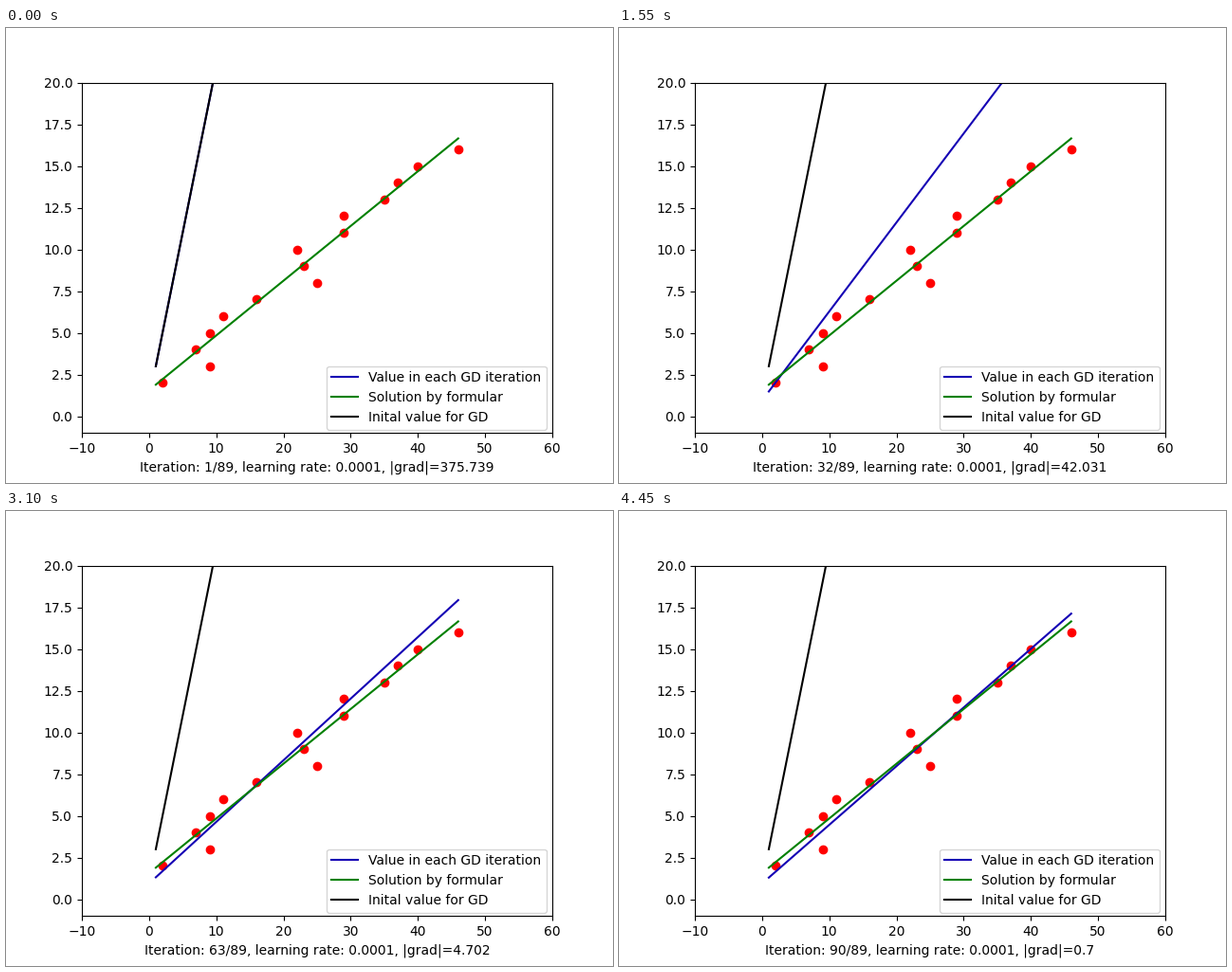
Recreate the animation shown at these times as a matplotlib script. Size 640x480 px, loop 4.5 s.

```python
import matplotlib.pyplot as plt
import numpy as np
from matplotlib.animation import FuncAnimation

STEPS = 90
RATE = 0.0001

plt.rcParams["font.family"] = "DejaVu Sans"

x = np.array([2, 9, 7, 9, 11, 16, 25, 23, 22, 29, 29, 35, 37, 40, 46], float)
y = np.arange(2, 17, dtype=float)
design = np.column_stack([np.ones_like(x), x])
ends = np.array([1.0, 46.0])


def gradient(weights):
    return design.T @ (design @ weights - y) / len(x)


def line_at(weights):
    return weights[0] + weights[1] * ends


def descend(start):
    path = [start]
    for _ in range(STEPS - 1):
        path.append(path[-1] - RATE * gradient(path[-1]))
    return path


path = descend(np.array([1.0, 2.0]))
best = np.linalg.lstsq(design, y, rcond=None)[0]

fig, ax = plt.subplots(figsize=(6.4, 4.8), dpi=100)
ax.set(xlim=(-10, 60), ylim=(-1, 20))
ax.plot(x, y, "ro")
fit, = ax.plot(ends, line_at(path[0]), color="#1400b4",
               label="Value in each GD iteration")
ax.plot(ends, line_at(best), color="green", label="Solution by formular")
ax.plot(ends, line_at(path[0]), color="black", label="Inital value for GD")
ax.legend(loc=(0.52, 0.01))
caption = ax.set_xlabel("")


def update(i):
    fit.set_ydata(line_at(path[i]))
    size = round(float(np.linalg.norm(gradient(path[i]))) / 3, 3)
    caption.set_text(f"Iteration: {i + 1}/{STEPS - 1}, "
                     f"learning rate: {RATE}, |grad|={size}")
    return fit, caption


anim = FuncAnimation(fig, update, frames=STEPS, interval=50,
                     repeat=True, repeat_delay=0)
plt.show()
```
